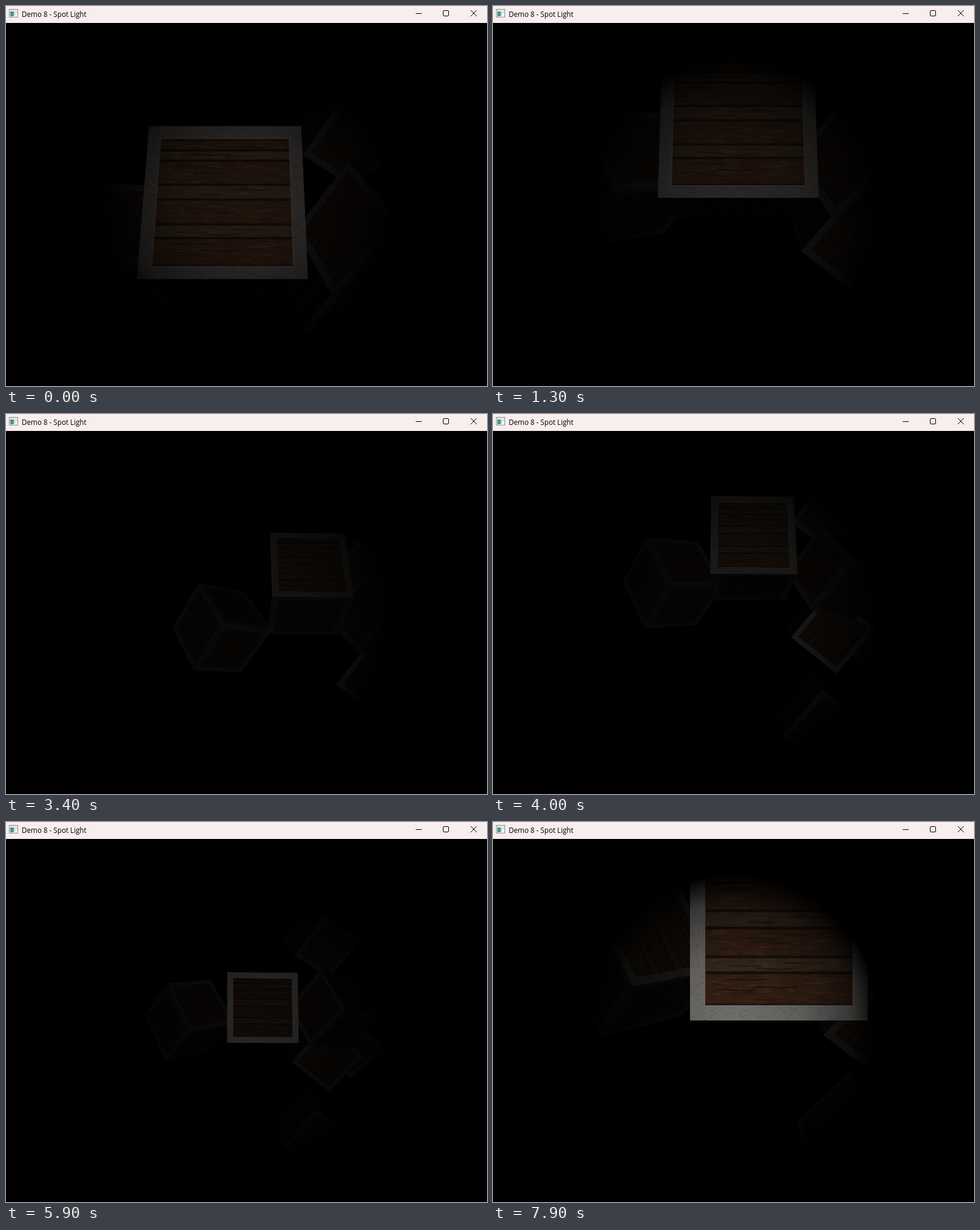
An HTML page with a canvas for the animation above (8 s loop, 796x628 px).

```html
<!DOCTYPE html>
<html lang="en">
<head>
<meta charset="utf-8">
<title>Demo 8 - Spot Light</title>
<style>
  html, body { margin: 0; width: 100%; height: 100%; overflow: hidden; background: #000; }
  canvas { position: absolute; left: 0; top: 0; }
  header {
    position: absolute; left: 0; top: 0; width: 796px; height: 28px;
    background: #f8eeed; color: #000;
    font: 11.7px/26px "Open Sans", "Noto Sans", sans-serif;
  }
  header span { position: absolute; left: 26px; top: 0; white-space: pre; }
  header svg { position: absolute; left: 0; top: 0; }
</style>
</head>
<body>
<canvas id="view" width="796" height="628"></canvas>
<header>
  <span>Demo 8 - Spot Light</span>
  <svg width="796" height="28" fill="none" stroke="#000">
    <rect x="5.5" y="5.5" width="14" height="13" fill="#f4f4f4" stroke="#8b9292"/>
    <path d="M6 7H19" stroke="#c9cfcf"/>
    <rect x="7" y="9" width="6" height="8" fill="#4f958b" stroke="none"/>
    <path d="M14.5 9V16M17.5 9V12" stroke="#b4bcbc"/>
    <path d="M678 12.5H688M769 7L779 17M779 7L769 17"/>
    <rect x="723.5" y="7.5" width="9" height="9" rx="1.5"/>
  </svg>
</header>
<script>
const LOOP = 8000, STEP = 100;
const MID_X = 398, MID_Y = 328, FOCAL = 724, SPOT = 242;
const SIZE = 256, RIM = 22, CELLS = 8;
const ctx = document.getElementById('view').getContext('2d');

let seed = 7;
const rand = () => (seed = (seed * 16807) % 2147483647) / 2147483647;
const between = (a, b) => a + (b - a) * rand();

// --- Crate texture ---

function newCanvas(paint) {
  const c = document.createElement('canvas');
  c.width = c.height = SIZE;
  if (paint) paint(c.getContext('2d'));
  return c;
}

function speckle(g, count, x, y, w, h, maxLen, strength) {
  for (let i = 0; i < count; i++) {
    const tone = rand() < 0.6 ? 0 : 255;
    g.fillStyle = `rgba(${tone},${tone},${tone},${strength * rand()})`;
    const len = between(1, maxLen);
    g.fillRect(x + rand() * (w - len), y + rand() * (h - 1), len, between(0.6, 1.6));
  }
}

function paintPlanks(g) {
  const inner = SIZE - 2 * RIM;
  const seams = [0, 0.09, 0.17, 0.36, 0.476, 0.673, 0.78, 1];
  for (let i = 0; i < 7; i++) {
    const y = RIM + seams[i] * inner, h = (seams[i + 1] - seams[i]) * inner;
    g.fillStyle = i % 2 ? '#735439' : '#6a3f25';
    g.fillRect(RIM, y, inner, h);
    speckle(g, h * 12, RIM, y, inner, h, 26, 0.15);
    // cracks along the grain
    g.strokeStyle = 'rgba(15,8,4,.6)';
    for (let k = 0; k < 3; k++) {
      const x = between(RIM, 150), cy = y + between(0.2, 0.8) * h;
      g.lineWidth = between(0.6, 1.6);
      g.beginPath();
      g.moveTo(x, cy);
      g.bezierCurveTo(x + 20, cy - 3, x + 35, cy + 3, x + between(40, 75), cy - 1);
      g.stroke();
    }
    const shade = g.createLinearGradient(0, y, 0, y + h);
    shade.addColorStop(0, 'rgba(8,4,2,.85)');
    shade.addColorStop(3 / h, 'rgba(8,4,2,0)');
    shade.addColorStop(1 - 3 / h, 'rgba(8,4,2,0)');
    shade.addColorStop(1, 'rgba(8,4,2,.9)');
    g.fillStyle = shade;
    g.fillRect(RIM, y, inner, h);
  }
}

function paintRim(g, color) {
  const far = SIZE - RIM, inner = far - RIM;
  g.save();
  g.beginPath();
  g.rect(0, 0, SIZE, SIZE);
  g.rect(RIM, RIM, inner, inner);
  g.clip('evenodd');
  g.fillStyle = color;
  g.fillRect(0, 0, SIZE, SIZE);
  speckle(g, 4000, 0, 0, SIZE, SIZE, 3, 0.35);
  g.restore();
  g.strokeStyle = 'rgba(255,255,255,.22)';
  g.lineWidth = 1.5;
  g.strokeRect(RIM - 1, RIM - 1, inner + 2, inner + 2);
}

const crate = newCanvas(g => { paintPlanks(g); paintRim(g, '#948f8a'); });
const gloss = newCanvas(g => paintRim(g, '#fffaf4'));
const skin = newCanvas();
const skinCtx = skin.getContext('2d');

function dressSkin(bright, shine) {
  skinCtx.globalAlpha = 1;
  skinCtx.drawImage(crate, 0, 0);
  skinCtx.globalAlpha = shine;
  skinCtx.drawImage(gloss, 0, 0);
  skinCtx.globalAlpha = 1 - bright;
  skinCtx.fillRect(0, 0, SIZE, SIZE);
}

// --- Scene ---

const add = (a, b, k = 1) => a.map((v, i) => v + b[i] * k);
const dot = (a, b) => a[0] * b[0] + a[1] * b[1] + a[2] * b[2];

// The crate's three edge directions, turned about one shared tilted axis
function edges(degrees) {
  const u = [0.864, 0.259, 0.432], a = degrees * Math.PI / 180;
  const c = Math.cos(a), s = Math.sin(a);
  return [0, 1, 2].map(i => {
    const e = u.map((v, k) => (1 - c) * v * u[i] + (k === i ? c : 0));
    e[(i + 1) % 3] += s * u[(i + 2) % 3];
    e[(i + 2) % 3] -= s * u[(i + 1) % 3];
    return e;
  });
}

// x, y, z, turn in degrees
const crates = [
  [0, 0, 0, 0],
  [1.5, 0.25, -1.5, 160],
  [1.49, -0.4, -2.43, 120],
  [1.5, 2, -2.5, 140],
  [2.4, -0.4, -3.5, 80],
  [1.3, -2, -2.5, 120],
  [-1.2, 0.1, -1.5, 180]
];

const faces = crates.flatMap(([x, y, z, turn]) => {
  const [ex, ey, ez] = edges(turn);
  return [[ez, ex, ey], [ex, ey, ez], [ey, ex, ez]].flatMap(([n, u, v]) =>
    [1, -1].map(side => {
      const normal = n.map(k => k * side);
      const center = add([x, y, z], normal, 0.5);
      const corner = (a, b) => add(add(center, u, a / 2), v, b / 2);
      return { normal, center, corners: [corner(-1, 1), corner(1, 1), corner(1, -1), corner(-1, -1)] };
    }));
});

// Camera path: time, x, y, z, yaw, pitch, light level
const path = [
  [0, 0.14, -0.89, 3.06, 0, 0.32, 0.29],
  [1300, -0.03, -1, 3.17, 0, 0.17, 0.29],
  [2300, 1.49, 0.4, 3.26, 0, 0, 0.4],
  [3400, -0.9, -3.3, 5, 0.02, 0.52, 0.42],
  [4700, 0.44, -1.14, 5.39, 0, 0, 0.5],
  [5900, -0.5, -1, 6.53, 0.045, 0.134, 0.38],
  [7900, -0.255, -0.5, 2.96, 0, 0, 0.42]
];

function cameraAt(t) {
  let i = 1;
  while (i < path.length - 1 && path[i][0] < t) i++;
  const a = path[i - 1], b = path[i], p = (t - a[0]) / (b[0] - a[0]);
  const [, x, y, z, yaw, pitch, level] = a.map((v, n) => v + (b[n] - v) * p);
  return { eye: [x, y, z], yaw, pitch, level };
}

function project(point, cam) {
  const [x, y, back] = add(point, cam.eye, -1);
  const side = x * Math.cos(cam.yaw) + back * Math.sin(cam.yaw);
  const ahead = x * Math.sin(cam.yaw) - back * Math.cos(cam.yaw);
  const up = y * Math.cos(cam.pitch) - ahead * Math.sin(cam.pitch);
  const depth = ahead * Math.cos(cam.pitch) + y * Math.sin(cam.pitch);
  return [MID_X + FOCAL * side / depth, MID_Y - FOCAL * up / depth];
}

// --- Drawing ---

function warpSkin([tl, tr, br, bl]) {
  const at = (u, v) => [0, 1].map(i =>
    (tl[i] * (1 - u) + tr[i] * u) * (1 - v) + (bl[i] * (1 - u) + br[i] * u) * v);
  const s = SIZE / CELLS;
  ctx.save();
  ctx.beginPath();
  for (const p of [tl, tr, br, bl]) ctx.lineTo(...p);
  ctx.clip();
  for (let r = 0; r < CELLS; r++) {
    for (let c = 0; c < CELLS; c++) {
      const o = at(c / CELLS, r / CELLS);
      const x = at((c + 1) / CELLS, r / CELLS), y = at(c / CELLS, (r + 1) / CELLS);
      ctx.setTransform((x[0] - o[0]) / s, (x[1] - o[1]) / s,
        (y[0] - o[0]) / s, (y[1] - o[1]) / s, o[0], o[1]);
      const w = Math.min(s + 2, SIZE - c * s), h = Math.min(s + 2, SIZE - r * s);
      ctx.drawImage(skin, c * s, r * s, w, h, 0, 0, w, h);
    }
  }
  ctx.restore();
}

const spot = ctx.createRadialGradient(MID_X, MID_Y, 0, MID_X, MID_Y, SPOT);
spot.addColorStop(0, 'rgba(0,0,0,0)');
spot.addColorStop(0.45, 'rgba(0,0,0,.15)');
spot.addColorStop(0.8, 'rgba(0,0,0,.5)');
spot.addColorStop(1, '#000');

function draw(t) {
  const cam = cameraAt(t);
  ctx.fillStyle = '#000';
  ctx.fillRect(0, 0, 796, 628);
  const visible = faces.map(face => {
    const toEye = add(cam.eye, face.center, -1), dist = Math.hypot(...toEye);
    return { face, dist, facing: dot(face.normal, toEye) / dist };
  }).filter(f => f.facing > 0).sort((a, b) => b.dist - a.dist);

  for (const { face, dist, facing } of visible) {
    const bright = cam.level * facing ** 1.5 * (3 / dist) ** 1.2;
    const shine = Math.min(1, Math.max(0, (facing - 0.95) * 30));
    dressSkin(Math.min(1, bright), shine);
    warpSkin(face.corners.map(p => project(p, cam)));
  }
  ctx.fillStyle = spot;
  ctx.fillRect(0, 0, 796, 628);
}

let shown = -1;
function tick(now) {
  const t = Math.floor((now % LOOP) / STEP) * STEP;
  if (t !== shown) draw(shown = t);
  requestAnimationFrame(tick);
}
tick(performance.now());
</script>
</body>
</html>
```
